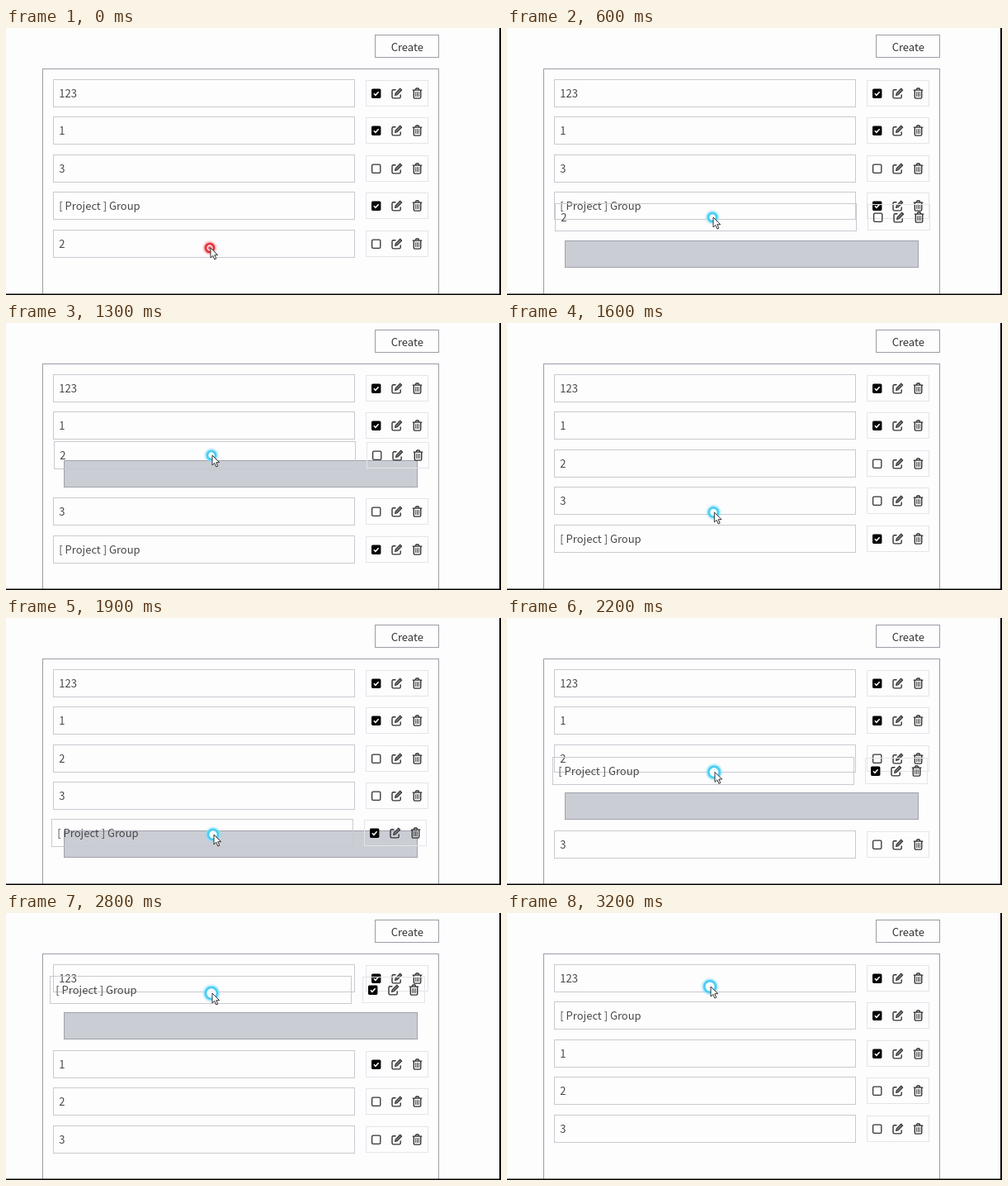
Write an HTML page that moves like this. It is 600x323 px and loops after 3300 ms.

```html
<!DOCTYPE html>
<html lang="en">
<head>
<meta charset="utf-8">
<title>Sortable list</title>
<style>
html, body { margin: 0; width: 100%; height: 100%; overflow: hidden; background: #fefdfe; }
svg { display: block; }
text { font: 13px "Noto Sans CJK KR", "Noto Sans CJK JP", "Noto Sans CJK SC", "Noto Sans", sans-serif; fill: #484848; white-space: pre; }
.line { fill: none; stroke: #c9c9d0; }
.tools { fill: none; stroke: #e4e4ea; }
.frame { fill: none; stroke: #9c9ca6; }
</style>
</head>
<body>
<svg width="600" height="323" viewBox="0 0 600 323">
  <defs>
    <filter id="soft" x="-50%" y="-50%" width="200%" height="200%"><feGaussianBlur stdDeviation="1.2"/></filter>
    <g id="tools" fill="none" stroke="#333" stroke-width="1.4" stroke-linecap="round" stroke-linejoin="round">
      <!-- edit -->
      <path d="M472 12.2h-2.4a1.6 1.6 0 0 0-1.6 1.6v7a1.6 1.6 0 0 0 1.6 1.6h7a1.6 1.6 0 0 0 1.6-1.6v-2.4"/>
      <path d="M471.6 19l.5-2.7 5.6-5.6 2 2-5.6 5.6z" fill="#777" stroke-width="1.1"/>
      <!-- delete -->
      <path d="M493.2 12.6h10.6M496.2 12.4l.9-1.9h2.8l.9 1.9M494.3 12.8v8.4a1.4 1.4 0 0 0 1.4 1.4h5.6a1.4 1.4 0 0 0 1.4-1.4v-8.4"/>
      <path d="M496.6 15v5.2M498.5 15v5.2M500.4 15v5.2" stroke-width=".9"/>
    </g>
  </defs>
  <rect width="600" height="323" fill="#fefdfe"/>
  <rect class="frame" x="447.5" y="8.5" width="77" height="27"/>
  <text x="486.3" y="27.5" text-anchor="middle" style="fill:#333">Create</text>
  <rect class="frame" x="44.5" y="49.5" width="480" height="290"/>
  <g id="list"></g>
  <rect id="gap" x="70.5" width="428" height="32" fill="#cacdd4" stroke="#a0a2aa"/>
  <g id="top"></g>
  <path d="M598 0h2v323H0v-1.5h598z"/>
  <g id="pointer">
    <circle id="glow" fill="none" stroke-width="4" filter="url(#soft)"/>
    <circle id="ring" stroke-width="2.6"/>
    <circle id="dot" r="2" fill="#e8606a"/>
    <path d="M1 0v12l2.8-2.6 2 4.6 2-.9-2-4.4h3.9z" fill="#fff" stroke="#333" stroke-width="1"/>
  </g>
</svg>
<script>
const $ = id => document.getElementById(id);
const LOOP = 3300, STEP = 100, SHIFT = 13;
const slotY = i => 62.5 + Math.round(45.4 * i);

// time, pointer x, pointer y, ring radius, dragged row x offset, dragged row y
const path = [
  [0, 247, 266, 5, 0, 244],
  [100, 247, 264, 5, 0, 243],
  [600, 249, 229, 5, 1, 212],
  [1200, 249, 162, 5, 1, 145],
  [1300, 249, 160, 5, 1, 143],
  [1400, 249, 163, 5.5, 0, 143],
  [1700, 251, 262, 5.5, 0, 244],
  [1800, 251, 262, 5, 0, 244],
  [1900, 251, 262, 6, -2, 243],
  [2400, 251, 136, 7, -2, 118],
  [2800, 249, 97, 7, -4, 76],
  [3100, 248, 93, 7, -4, 72],
  [3200, 246, 89, 6.8, 0, 72]
];

// each phase: start time, order of the resting rows, dragged row
const phases = [
  [0, ["123", "1", "3", "G", "2"]],
  [100, ["123", "1", "3", "G"], "2"],
  [1400, ["123", "1", "2", "3", "G"]],
  [1900, ["123", "1", "2", "3"], "G"],
  [3200, ["123", "G", "1", "2", "3"]]
];

const checked = { "123": true, "1": true, G: true };
const rows = {};

function makeRow(key) {
  const row = document.createElementNS("http://www.w3.org/2000/svg", "g");
  const label = key === "G" ? "[ Project ] Group" : key;
  const box = checked[key]
    ? `<rect x="443" y="11" width="11.4" height="11.4" rx="1.6"/>
       <path d="M445.9 16.8l2 2 3.7-4" fill="none" stroke="#fff" stroke-width="1.5"/>`
    : `<rect x="443.6" y="11.6" width="10.2" height="10.2" rx="1.4" fill="none" stroke="#333" stroke-width="1.3"/>`;
  row.innerHTML = `<rect class="line" x="57.5" width="365" height="33"/>
    <text x="64.3" y="21.7">${label}</text>
    <rect class="tools" x="436.5" y="1" width="75" height="31"/>
    ${box}<use href="#tools"/>`;
  rows[key] = row;
}
["123", "1", "2", "3", "G"].forEach(makeRow);

function place(key, parent, x, y) {
  parent.appendChild(rows[key]);
  rows[key].setAttribute("transform", `translate(${x} ${y})`);
}

function sample(t) {
  let i = path.length - 1;
  while (path[i][0] > t) i--;
  const a = path[i], b = path[i + 1] || a;
  const k = a === b ? 0 : (t - a[0]) / (b[0] - a[0]);
  return a.map((v, n) => v + (b[n] - v) * k);
}

function drawPointer(x, y, r, pressed) {
  $("pointer").setAttribute("transform", `translate(${x} ${y})`);
  $("ring").setAttribute("r", r);
  $("ring").setAttribute("stroke", pressed ? "#e6323c" : "#48cdf2");
  $("ring").setAttribute("fill", pressed ? "#fbdcde" : "#f4fcff");
  $("glow").setAttribute("r", r + 0.8);
  $("glow").setAttribute("stroke", pressed ? "#f6a0a4" : "#8fe0f8");
  $("dot").style.display = pressed ? "" : "none";
}

function draw(t) {
  const [, x, y, r, dx, dragY] = sample(t);
  const [, order, held] = phases.filter(p => p[0] <= t).pop();
  const gap = held ? Math.min(4, Math.ceil((dragY - 71) / 45.4)) : 5;

  order.forEach((key, i) => {
    const below = i >= gap;
    place(key, $("list"), 0, slotY(i + below) + below * SHIFT);
  });
  $("gap").style.display = held ? "" : "none";
  if (held) {
    $("gap").setAttribute("y", slotY(gap) + SHIFT);
    place(held, $("top"), Math.round(dx), Math.round(dragY) + 0.5);
  }
  drawPointer(x, y, r, t < 100 || t === 1800);
}

const start = performance.now();
let last = -1;
function tick() {
  const t = Math.floor((performance.now() - start) % LOOP / STEP) * STEP;
  if (t !== last) draw(last = t);
  requestAnimationFrame(tick);
}
tick();
</script>
</body>
</html>
```
